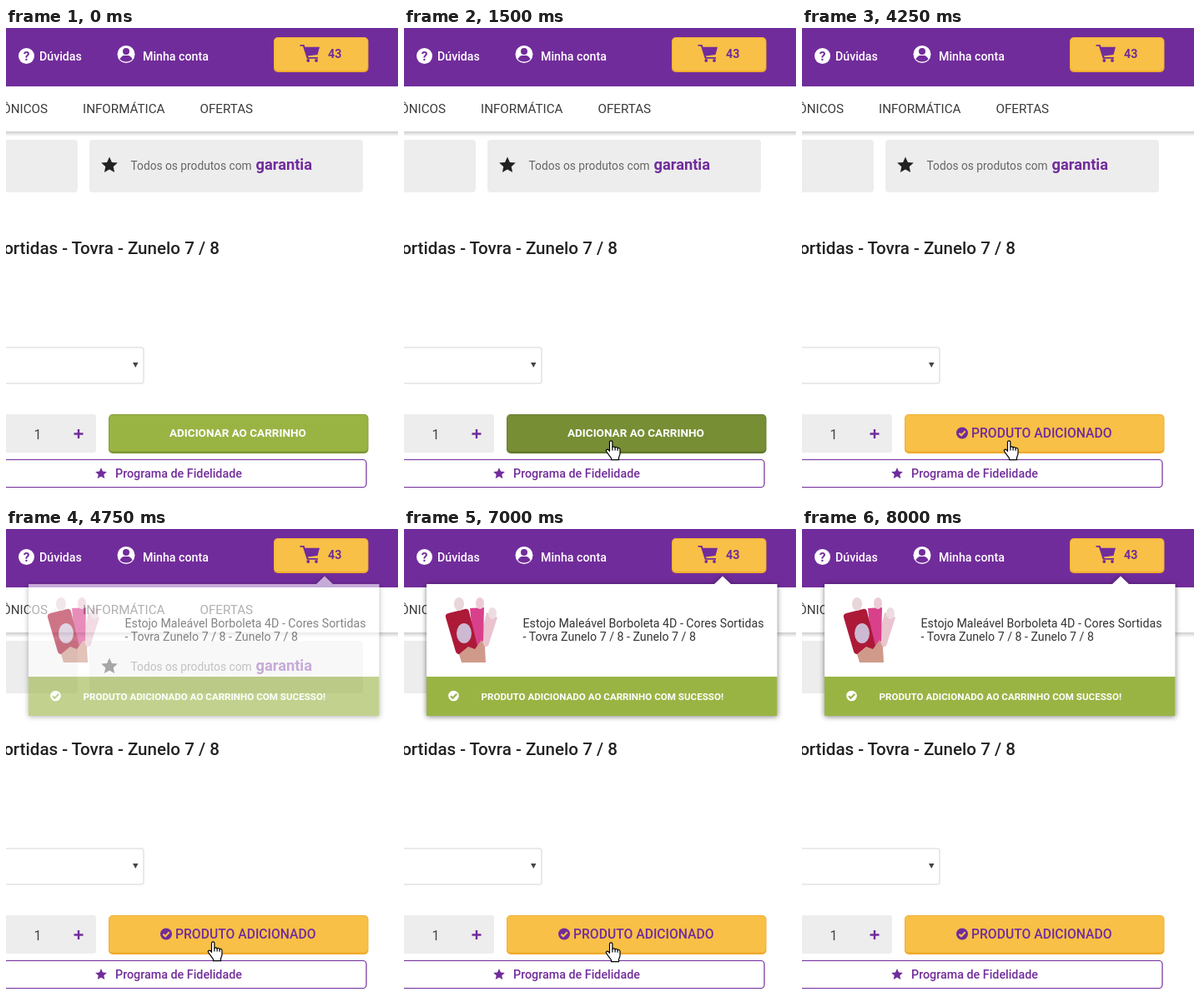
Write an HTML page that moves like this. It is 470 by 567 pixels and loops after 8.25 s.

```html
<!DOCTYPE html>
<html lang="pt-BR">
<head>
<meta charset="utf-8">
<title>Adicionar ao carrinho</title>
<style>
  :root { --purple: #712c9b; --green: #9ab444; --gold: #f8c046; --grey: #ededed; --loop: 8250ms; }
  html, body { margin: 0; width: 100%; height: 100%; overflow: hidden; background: #fff; }
  svg { display: block; width: 100vw; height: 100vh; }
  text { font-family: Roboto, "Open Sans", sans-serif; font-size: 14.2px; fill: #222; }
  .purple { fill: var(--purple); }
  .white { fill: #fff; }
  .grey { fill: var(--grey); }
  .gold { fill: var(--gold); }
  .green { fill: var(--green); }
  .med { font-weight: 500; }
  .bold { font-weight: 700; }
  .nav text { font-size: 15.2px; fill: #3a3a3a; }
  .end { text-anchor: end; }
  .mid { text-anchor: middle; }

  .face, .lip, .ask, .done, .popup, .hand, .arrow, .loyalty { animation: var(--loop) step-end infinite; }
  .face { animation-name: face; }
  .lip { animation-name: lip; }
  .ask { animation-name: ask; }
  .done { animation-name: done; }
  .popup { animation-name: popup; filter: drop-shadow(0 1px 3px rgba(0, 0, 0, .5)); }
  .popup text { fill: #333; }
  .popup .white { fill: #fff; }
  .hand { animation-name: hand; }
  .arrow { animation-name: arrow; }
  .loyalty { animation-name: loyalty; stroke: var(--purple); stroke-width: 1.2; }

  @keyframes face {
    0% { fill: #9ab444; }
    15.151% { fill: #778e35; }
    36.363% { fill: #6e8432; }
    39.393% { fill: #657a2f; }
    51.515%, 100% { fill: #f8c046; }
  }
  @keyframes lip {
    0% { fill: #7d9636; }
    15.151% { fill: #62772a; }
    36.363% { fill: #5b6e28; }
    39.393% { fill: #546726; }
    51.515%, 100% { fill: #efab2d; }
  }
  @keyframes ask { 0% { opacity: 1; } 51.515%, 100% { opacity: 0; } }
  @keyframes done { 0% { opacity: 0; } 51.515%, 100% { opacity: 1; } }
  @keyframes popup { 0% { opacity: 0; } 57.575% { opacity: .6; } 60.606%, 100% { opacity: 1; } }
  @keyframes hand {
    0% { opacity: 0; transform: translate(241px, 535px); }
    12.121% { opacity: 1; transform: translate(241px, 535px); }
    15.151% { opacity: 1; transform: translate(241px, 495px); }
    18.181% { opacity: 1; transform: translate(241px, 494px); }
    84.848% { opacity: 1; transform: translate(241px, 495px); }
    87.878%, 100% { opacity: 0; transform: translate(241px, 495px); }
  }
  @keyframes arrow { 0% { opacity: 0; } 87.878% { opacity: 1; } 90.909%, 100% { opacity: 0; } }
  @keyframes loyalty { 0% { fill: #fff; } 12.121% { fill: #f3ecf8; } 15.151%, 100% { fill: #fff; } }
</style>
</head>
<body>
<svg viewBox="0 0 470 567" preserveAspectRatio="none">
  <defs>
    <path id="star" d="M0-10 2.9-3.6 9.8-2.9 4.7 1.8 6.1 8.6 0 5.1-6.1 8.6-4.7 1.8-9.8-2.9-2.9-3.6z"/>
    <path id="tick" d="M-3.6.2-1 2.7 3.7-2.2" fill="none" stroke-width="2.1"/>
    <linearGradient id="shade" x2="0" y2="1">
      <stop stop-color="#000" stop-opacity=".2"/>
      <stop offset="1" stop-color="#000" stop-opacity="0"/>
    </linearGradient>
  </defs>
  <rect class="white" width="470" height="567"/>

  <!-- header -->
  <rect class="purple" width="470" height="70"/>
  <circle class="white" cx="24.5" cy="33.5" r="9.5"/>
  <text class="purple bold mid" x="24.5" y="39" style="font-size:15.5px">?</text>
  <text class="white med" x="40" y="39">Dúvidas</text>
  <circle class="white" cx="144" cy="31.5" r="10.5"/>
  <circle class="purple" cx="144" cy="28" r="4"/>
  <path class="purple" d="M136.5 37.5q2-4.5 5-4.5h5q3 0 5 4.5-3 3-7.5 3t-7.5-3z"/>
  <text class="white med" x="164" y="39">Minha conta</text>
  <rect x="321" y="11" width="113.5" height="42" rx="5" fill="#efab2d"/>
  <rect class="gold" x="321.7" y="11.7" width="112" height="39.3" rx="4.5"/>
  <g class="purple">
    <path d="M352.5 20h5l1 2.7H376l-2.5 9.3-11.5 1.4.5 1.6H374v1.8H360.8L356 21.8H352.500z"/>
    <circle cx="362.3" cy="39" r="1.9"/>
    <circle cx="372" cy="39" r="1.9"/>
  </g>
  <text class="purple bold" x="386" y="36">43</text>

  <!-- navigation -->
  <rect y="124" width="470" height="6" fill="url(#shade)"/>
  <g class="nav">
    <text class="end" x="50" y="102">ELETRÔNICOS</text>
    <text x="92" y="102">INFORMÁTICA</text>
    <text x="232.5" y="102">OFERTAS</text>
  </g>

  <!-- product -->
  <rect class="grey" x="-10" y="134" width="96" height="63" rx="4"/>
  <rect class="grey" x="100" y="134" width="328" height="63" rx="4"/>
  <use href="#star" x="124" y="164.5" fill="#222"/>
  <text x="149.5" y="170" style="font-size:13.75px;fill:#666">Todos os produtos com</text>
  <text class="purple bold" x="299.5" y="170" style="font-size:18.3px">garantia</text>
  <text class="med end" x="256" y="271" style="font-size:20.6px">Cores Sortidas - Tovra - Zunelo 7 / 8</text>
  <rect x="-10" y="383" width="175" height="43" rx="3" fill="#fff" stroke="#e3e3e3" stroke-width="1.5"/>
  <path d="M152 401h6.500l-3.250 6z" fill="#444"/>
  <rect class="grey" x="-10" y="463" width="118" height="46" rx="3"/>
  <text class="mid" x="38" y="493" style="font-size:16px;fill:#444">1</text>
  <path d="M81.500 486.500h11M87 481v11" stroke="var(--purple)" stroke-width="2.4"/>

  <!-- add button -->
  <rect class="lip" x="123" y="463" width="311.5" height="47" rx="5"/>
  <rect class="face" x="123.7" y="463.7" width="310" height="43.8" rx="4.5"/>
  <text class="ask white bold" x="196" y="490" style="font-size:13.5px">ADICIONAR AO CARRINHO</text>
  <g class="done">
    <circle class="purple" cx="192" cy="485.5" r="7"/>
    <use href="#tick" x="192" y="485.5" stroke="var(--gold)"/>
    <text class="purple med" x="203" y="491" style="font-size:15.7px">PRODUTO ADICIONADO</text>
  </g>

  <rect class="loyalty" x="-10" y="517.5" width="442" height="33" rx="4"/>
  <use href="#star" class="purple" transform="translate(114 534) scale(.7)"/>
  <text class="purple med" x="131" y="539" style="font-size:14.3px">Programa de Fidelidade</text>

  <!-- confirmation -->
  <g class="popup">
    <path class="white" d="M27 66H372l10-9.500 10 9.500H447.500V224H27z"/>
    <rect class="green" x="27" y="177" width="420.5" height="47"/>
    <g>
      <path d="M99 100 112 106 101 140 88 146z" fill="#e9c4cf"/>
      <path d="M79 95 96 94 95 134 84 146z" fill="#d9408c"/>
      <path d="M50 106q-1-4 3-5l20-5q4-1 5 3l10 41q1 4-3 5l-17 5q-4 1-6-3z" fill="#ac1a38"/>
      <ellipse cx="66" cy="90" rx="6" ry="8" fill="#e8d6da"/>
      <ellipse cx="91" cy="89" rx="5" ry="7" fill="#eccbd8"/>
      <ellipse cx="106" cy="101" rx="5" ry="7" fill="#eddce1"/>
      <ellipse cx="72" cy="125" rx="9" ry="12" fill="#cdb9d2"/>
      <path d="M66 150 77 141l8 3 8-11 4 9 1 18H69z" fill="#d09a8a"/>
    </g>
    <text x="142.5" y="118">Estojo Maleável Borboleta 4D - Cores Sortidas</text>
    <text x="142.5" y="134">- Tovra Zunelo 7 / 8 - Zunelo 7 / 8</text>
    <circle class="white" cx="59.5" cy="200" r="6.3"/>
    <use href="#tick" x="59.5" y="200" stroke="var(--green)"/>
    <text class="white bold" x="92.5" y="205" style="font-size:11.6px">PRODUTO ADICIONADO AO CARRINHO COM SUCESSO!</text>
  </g>

  <!-- pointers -->
  <g class="hand" stroke="#000" stroke-width="1.2" stroke-linejoin="round">
    <path class="white" d="M5.500 2.500a1.700 1.700 0 0 1 3.400 0v6c.5-1 3-.8 3.200.5.6-.9 2.800-.6 3 .7.8-.7 2.900-.3 2.900 1.600v5c0 2-1.500 3.200-1.500 5v2.400H7.500v-2c-1.500-2.500-4-5-6-8.500-.8-1.800 1.500-2.800 3-1.200l1 1.300z"/>
    <path d="M8.900 8.500v4M12.100 9v3.500M15.100 9.700v3" fill="none"/>
  </g>
  <path class="arrow" d="M250 553v16l3.700-3.500 2.600 6 2.500-1-2.600-5.800h5.300z" fill="#fff" stroke="#000"/>
</svg>
</body>
</html>
```
